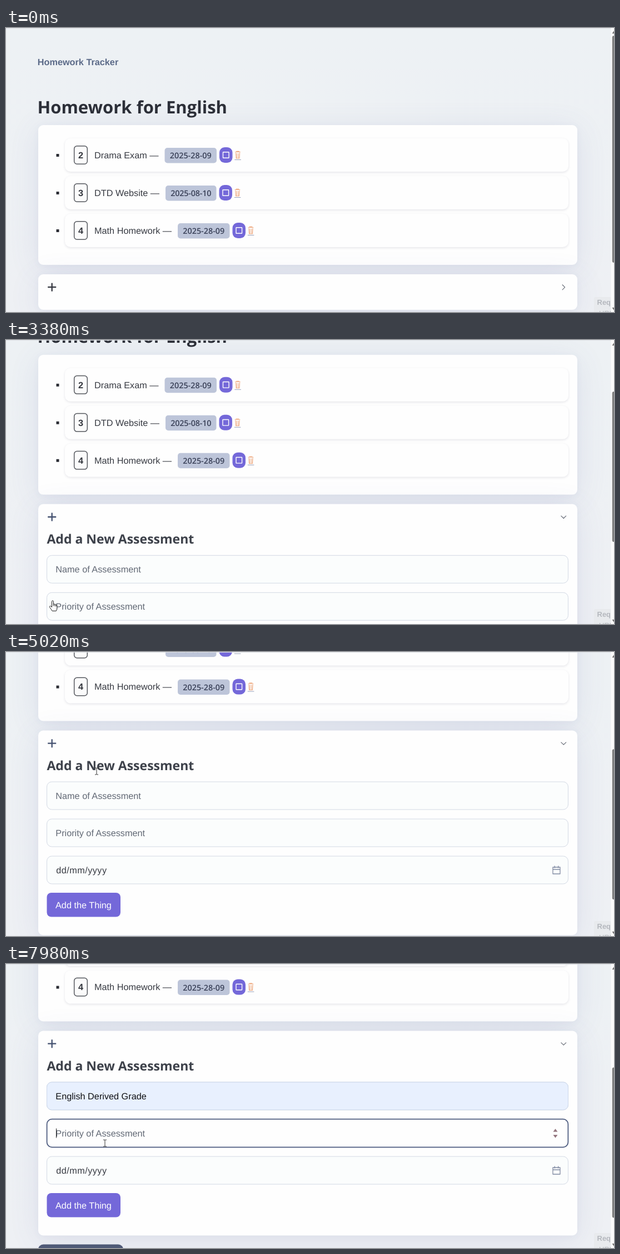
An HTML page for the animation above (8000 ms loop, 1094 by 512 pixels).

```html
<!DOCTYPE html>
<html lang="en">
<head>
<meta charset="utf-8">
<title>Homework Tracker</title>
<style>
html, body { margin: 0; width: 100%; height: 100%; overflow: hidden; }
#stage { position: relative; width: 1094px; height: 512px; overflow: hidden; background: linear-gradient(#edf1f4, #eef0f4); }
#page { position: absolute; left: 0; top: 0; width: 1094px; height: 1000px; }
#page div { position: absolute; box-sizing: border-box; }
.card { left: 57.5px; width: 970.5px; border-radius: 9px; background: #fefefe;
  box-shadow: 0 8px 55px rgba(80, 92, 160, .11), 0 2px 12px rgba(80, 92, 160, .05); }
.item { left: 106px; width: 906px; height: 60px; border-radius: 10px; background: #fefefe;
  box-shadow: 0 1.5px 4px rgba(40, 45, 70, .12); }
#back { left: 57.5px; width: 153.5px; height: 44px; border-radius: 9px; background: #4f5a77; }
svg { position: absolute; left: 0; top: 0; overflow: visible; }
text { font: 16.25px "Liberation Sans", Arial, sans-serif; fill: #373a42; white-space: pre; text-rendering: geometricPrecision; }
text.brand { font-weight: 700; fill: #5b6a88; }
text.h1 { font: 700 31px "Open Sans", sans-serif; fill: #2c2f38; }
text.h2 { font: 700 23px "Open Sans", sans-serif; fill: #3d414a; }
text.rank { font-weight: 700; text-anchor: middle; fill: #33363d; }
text.date { font: 600 14.4px "Open Sans", sans-serif; text-anchor: middle; fill: #3a4158; }
text.hint { fill: #626975; }
text.value { fill: #101114; }
text.white { fill: #fff; }
text.row { font: 500 10px "Open Sans", sans-serif; fill: #383838; }
text.req { font-size: 13px; fill: #b5b8be; }
text.bold { font-weight: 700; }
.line { fill: none; stroke-linecap: round; stroke-linejoin: round; }
</style>
</head>
<body>
<div id="stage">
  <div id="page">
    <div class="card" style="top:175px;height:252px"></div>
    <div class="card" id="form"></div>
    <div id="back"></div>
    <svg id="art" width="1094" height="1000"></svg>
  </div>
  <svg id="top" width="1094" height="512"></svg>
</div>
<script>
const $ = id => document.getElementById(id);
const page = $('page'), art = $('art'), over = $('top');
const LOOP = 8000, OPEN = 1810, FOCUS1 = 5750, PREVIEW = 6230, PICK = 6470, FOCUS2 = 6980;

const text = (x, y, s, cls = '', more = '') => `<text x="${x}" y="${y}" class="${cls}" ${more}>${s}</text>`;
const rect = (x, y, w, h, r, fill, more = '') =>
  `<rect x="${x}" y="${y}" width="${w}" height="${h}" rx="${r}" fill="${fill}" ${more}/>`;
const line = (d, color, width, more = '') =>
  `<path class="line" d="${d}" stroke="${color}" stroke-width="${width}" ${more}/>`;

// name, priority, date, badge left, badge width, letter spacing
const items = [
  ['Drama Exam —', 2, '2025-28-09', 285.5, 93.5, 0],
  ['DTD Website —', 3, '2025-08-10', 287, 91.5, -.2],
  ['Math Homework —', 4, '2025-28-09', 309, 93.5, 0]
];

function itemArt([name, rank, date, x, w, gap], i) {
  const c = 229 + 68 * i, b = x + w + 5, k = b + 28;
  const card = document.createElement('div');
  card.className = 'item';
  card.style.top = c - 30 + 'px';
  page.insertBefore(card, art);
  return rect(90.5, c - 2, 5, 5, 0, '#2b2d34')
    + rect(122.7, c - 16.3, 23.6, 32.6, 5, '#fbfbfb', 'stroke="#55585e" stroke-width="1.5"')
    + text(134.5, c + 5.8, rank, 'rank')
    + text(159, c + 5.8, name)
    + rect(b - w - 5, c - 13, w, 27.5, 5, '#bdc5d9')
    + text(x + w / 2, c + 6, date, 'date', `letter-spacing="${gap}"`)
    + rect(b, c - 14, 23.5, 28, 9.5, '#7468d9')
    + rect(b + 6.5, c - 5.3, 10.6, 10.6, .5, 'none', 'stroke="#fff" stroke-width="1.4"')
    + line(`M${k + .6} ${c - 5.5}h8.8M${k + 2.6} ${c - 6.6}h4.8M${k + 1.4} ${c - 4}l.7 10h5.8l.7-10`
      + `M${k + 3.6} ${c - 3}v8M${k + 6.4} ${c - 3}v8`, '#eeac84', 1.1)
    + line(`M${k - .3} ${c + 8.5}h10.8`, '#979fb8', 1);
}

const field = y => rect(73.5, y, 938, 50, 9, '#fbfdfd', 'stroke="#d3d9e4"');
const ring = (id, y) => rect(73.6, y, 937.8, 50.6, 9, 'none', `id="${id}" stroke="#4f5d80" stroke-width="1.8"`);

art.innerHTML = text(56.8, 67, 'Homework Tracker', 'brand')
  + text(56.5, 153.5, 'Homework for English', 'h1')
  + items.map(itemArt).join('')
  + line('M75.2 467.2h15M82.7 459.7v15', '#33363f', 2.3, 'id="plus" style="stroke-linecap:butt"')
  + line('M-4.4 -2.1L0 2.3L4.4 -2.1', '#686d78', 1.2, 'id="chevron"')
  + '<g id="fields" transform="translate(0 .5)">'
  + text(73.5, 515, 'Add a New Assessment', 'h2')
  + field(536) + rect(73.5, 536, 938, 50, 9, '#e8f0fe', 'id="filled" stroke="#cbd7ea"') + ring('ring1', 535.7)
  + text(89.3, 566.5, 'Name of Assessment', 'hint', 'id="hint"')
  + text(89.3, 566.5, 'English Derived Grade', 'value', 'id="value"')
  + field(603) + rect(74, 603.5, 937, 49, 9, '#fefefe', 'id="white2"') + ring('ring2', 602.7)
  + text(89.3, 633.5, 'Priority of Assessment', 'hint')
  + '<path id="spin" d="M984.5 625.5l4-5.5l4 5.5zM984.5 631l4 5.5l4-5.5z" fill="#94767f"/>'
  + field(670)
  + text(90.3, 700.8, 'dd/mm/yyyy', '', 'letter-spacing=".45"')
  + line('M984 690h13v12h-13zM984 694h13M987.3 688v3M993.7 688v3', '#808aa2', 1.3)
  + rect(73.5, 736, 132.5, 43.5, 8, '#7468d9')
  + text(89, 763.5, 'Add the Thing', 'white')
  + rect(0, 0, 1, 17, 0, '#222', 'id="caret"')
  + '</g>';

const rows = ['English Derived Grade', 'DTD Website', 'English Assessment', 'Drama Exam', 'Math Homework'];
over.innerHTML = rect(0, 0, 1094, 1, 0, '#dfe2e6')
  + rect(1058, 485, 31, 30, 3, '#e8eaed')
  + text(1063.5, 499, 'Req', 'req bold')
  + text(1067, 519, 'URL', 'req')
  + rect(1088.5, 0, 6, 512, 0, '#fbfbfb')
  + rect(1090.7, 14, 6, 409, 3, '#808080', 'id="thumb"')
  + '<path d="M1090.5 10l3.5-5v5zM1090.5 504l3.5 5v-5z" fill="#777"/>'
  + '<g id="menu">'
  + rect(154, 277.5, 146, 145.5, 4, '#000', 'opacity=".05"')
  + rect(155, 277, 144, 144, 4, '#fdfdfd')
  + rect(155, 277, 144, 27, 3, '#ececec', 'id="hover"')
  + rows.map((s, i) => text(164, 294 + 28.5 * i, s, 'row')).join('')
  + line('M278.5 287l6 6M284.5 287l-6 6', '#444', 1.1, 'id="cross"')
  + '</g><g id="cursor">'
  + '<path id="arrow" d="M0 0V13L3 10.4L5 15L7.2 14L5.2 9.6H9.2Z" fill="#fff" stroke="#222" stroke-width="1" stroke-linejoin="round"/>'
  + '<path id="hand" d="M-2 1.5Q-2 0 -.6 0Q.9 0 .9 1.5V6Q3 5.4 3.4 6.8Q5.2 6.2 5.6 7.6Q7.4 7.2 7.4 9V13Q7.4 15.5 5.8 18.5H-1.4Q-3 15.5 -6 11.6Q-6.6 10 -5.2 9.6Q-3.8 9.4 -2 11.5Z'
  + 'M.9 6V9.5M3.4 7V10M5.6 8V10.5" fill="#fff" stroke="#222" stroke-width="1" stroke-linejoin="round"/>'
  + line('M-2.6 -6H-.6L0 -5.4L.6 -6H2.6M0 -5.4V5.4M-2.6 6H-.6L0 5.4L.6 6H2.6', '#333', 1, 'id="beam"')
  + '</g>';

// [time, offset], each held until the next
const scrolls = [[0, 0], [3000, 18.5], [3130, 60], [3190, 81], [3250, 102], [3320, 126], [3380, 148.2],
  [3450, 178], [3520, 207], [3580, 231], [3650, 257.3], [3720, 283], [3790, 300],
  [5020, 302.5], [5090, 314], [5170, 323.5]];

// [time, x, y], moved along in straight lines
const path = [[340, 640, 421], [409, 640, 421], [410, 343, 397], [669, 343, 397], [670, 255, 348],
  [740, 180, 375], [810, 125, 415], [880, 92, 453], [1210, 92, 453], [1500, 84.5, 470],
  [3840, 84.5, 470], [4200, 92, 400], [4630, 113, 212], [4760, 163, 215], [5430, 163, 215],
  [5680, 184, 241], [5960, 184, 241], [6300, 190, 290], [6640, 190, 290], [6900, 178, 302],
  [7300, 178, 302], [7720, 178, 323]];

const shapes = [[0, ''], [340, 'arrow'], [870, 'hand'], [4080, 'beam'], [6040, 'arrow'], [6720, 'beam']];

const hold = (keys, t) => keys.filter(k => k[0] <= t).pop()[1];
const ramp = (t, a, b) => Math.min(1, Math.max(0, (t - a) / (b - a)));
const ease = u => u * u * (3 - 2 * u);

function along(keys, t) {
  const i = keys.findIndex(k => k[0] > t);
  if (i === 0) return keys[0].slice(1);
  if (i < 0) return keys[keys.length - 1].slice(1);
  const a = keys[i - 1], b = keys[i], u = ramp(t, a[0], b[0]);
  return [1, 2].map(n => a[n] + (b[n] - a[n]) * u);
}

const set = (id, name, v) => $(id).setAttribute(name, v);
const fade = (id, v) => set(id, 'opacity', +v);

function draw(t) {
  const open = t >= OPEN, scroll = hold(scrolls, t);
  page.style.transform = `translateY(${-scroll}px)`;
  $('form').style.cssText = `top:443.5px;height:${open ? 369 : 64.5}px`;
  $('back').style.top = (open ? 829 : 525) + 'px';
  set('fields', 'display', open ? 'inline' : 'none');
  set('thumb', 'height', open ? 271 : 409);
  set('thumb', 'y', 14 + scroll * .533);
  set('plus', 'stroke', t > 880 ? '#43506f' : '#33363f');
  set('chevron', 'transform', `translate(1003.3 467.4) rotate(${-90 * (1 - ease(ramp(t, OPEN, 2040)))})`);

  const second = ease(ramp(t, FOCUS2, 7170));
  const filled = t >= PREVIEW;
  fade('ring1', ease(ramp(t, FOCUS1, FOCUS1 + 200)) - second);
  fade('ring2', second);
  fade('white2', second);
  fade('filled', filled);
  fade('value', filled);
  fade('hint', !filled);
  fade('spin', t >= FOCUS2);

  // caret blinks, restarted by each focus or pick
  const since = t >= FOCUS2 ? FOCUS2 : t >= PICK ? PICK : FOCUS1;
  fade('caret', t >= FOCUS1 && (t - since) % 1000 < 500);
  set('caret', 'x', since === PICK ? 253 : 90);
  set('caret', 'y', since === FOCUS2 ? 619.5 : 552.5);

  fade('menu', ramp(t, 5840, 5980) * (1 - ramp(t, 6540, 6690)));
  fade('hover', filled);
  fade('cross', filled);

  const shape = hold(shapes, t);
  for (const s of ['arrow', 'hand', 'beam']) set(s, 'display', s === shape ? 'inline' : 'none');
  set('cursor', 'transform', `translate(${along(path, t)})`);
}

const start = performance.now();
function tick() {
  draw((performance.now() - start) % LOOP);
  requestAnimationFrame(tick);
}
tick();
</script>
</body>
</html>
```
